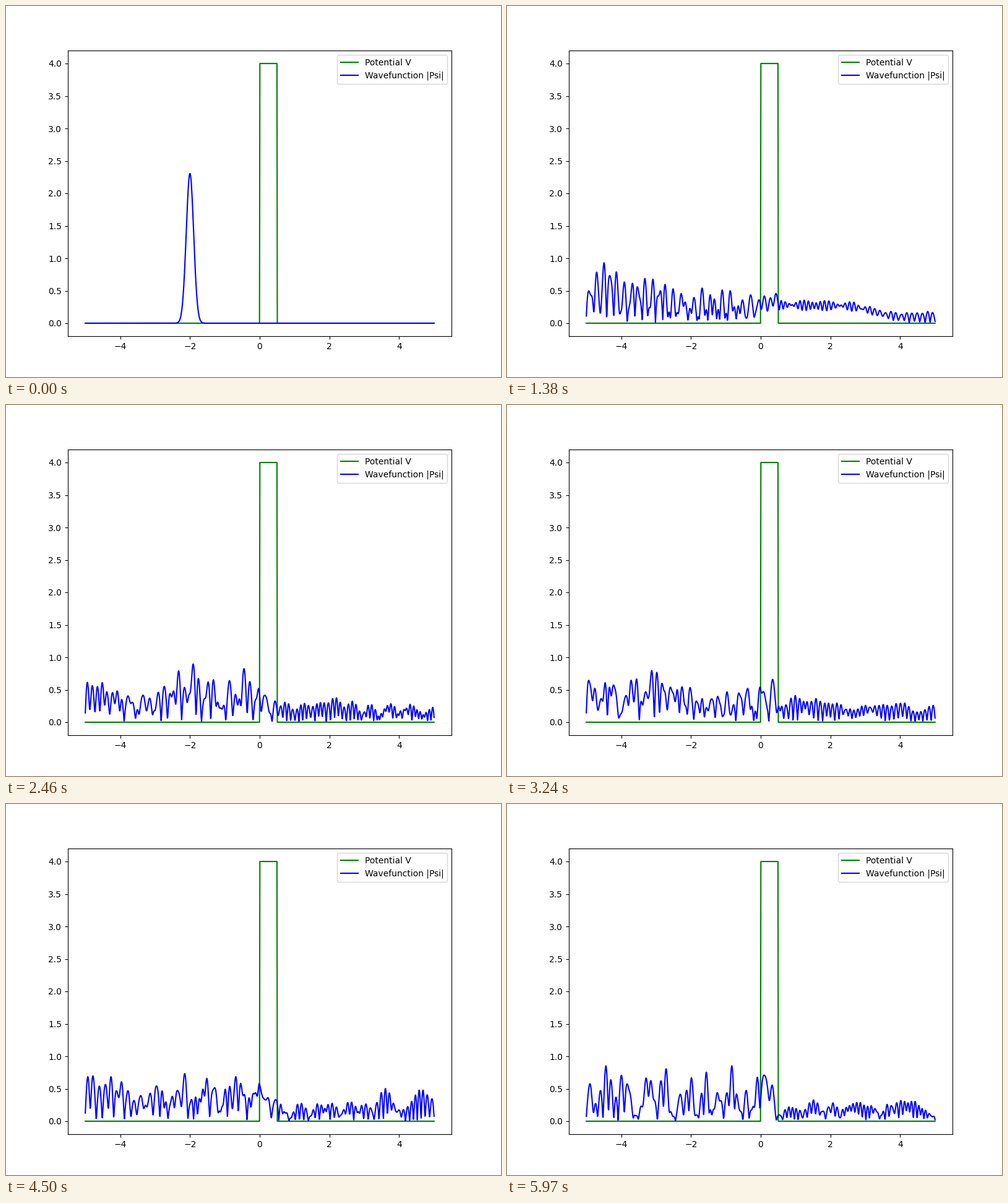
A matplotlib script for the animation above (6 s loop, 800 by 600 pixels).

```python
import numpy as np
import matplotlib.pyplot as plt
from matplotlib.animation import FuncAnimation

FRAMES, INTERVAL = 200, 30
N = 1000          # grid points
X0 = -2.0         # packet centre
WIDTH = 0.15      # packet width
K0 = 20.0         # mean wave number
V0 = 200.0        # barrier height, equal to K0**2 / 2
DT = 0.01         # time per frame

x = np.linspace(-5, 5, N)
dx = x[1] - x[0]
V = np.where((x >= 0) & (x <= 0.5), V0, 0.0)

# H = -1/2 d2/dx2 + V with hard walls just beyond both ends
hop = np.full(N - 1, -0.5 / dx**2)
H = np.diag(1 / dx**2 + V) + np.diag(hop, 1) + np.diag(hop, -1)
energy, states = np.linalg.eigh(H)

psi0 = np.exp(-((x - X0) / WIDTH) ** 2 + 1j * K0 * x)
psi0 /= np.sqrt(np.sum(np.abs(psi0) ** 2) * dx)
coeffs = states.T @ psi0


def amplitude(t):
    """|psi| on the grid at time t."""
    c = coeffs * np.exp(-1j * energy * t)
    return np.hypot(states @ c.real, states @ c.imag)


plt.rcParams["font.family"] = "DejaVu Sans"
fig, ax = plt.subplots(figsize=(8, 6), dpi=100)
ax.plot(x, V / 50, color="green", label="Potential V")
wave, = ax.plot(x, amplitude(0), color="blue", label="Wavefunction |Psi|")
ax.set_xlim(-5.5, 5.5)
ax.set_ylim(-0.2, 4.2)
ax.legend(loc="upper right")


def update(i):
    wave.set_ydata(amplitude(i * DT))
    return (wave,)


anim = FuncAnimation(fig, update, frames=FRAMES, interval=INTERVAL,
                     repeat=True, repeat_delay=0)
plt.show()
```
